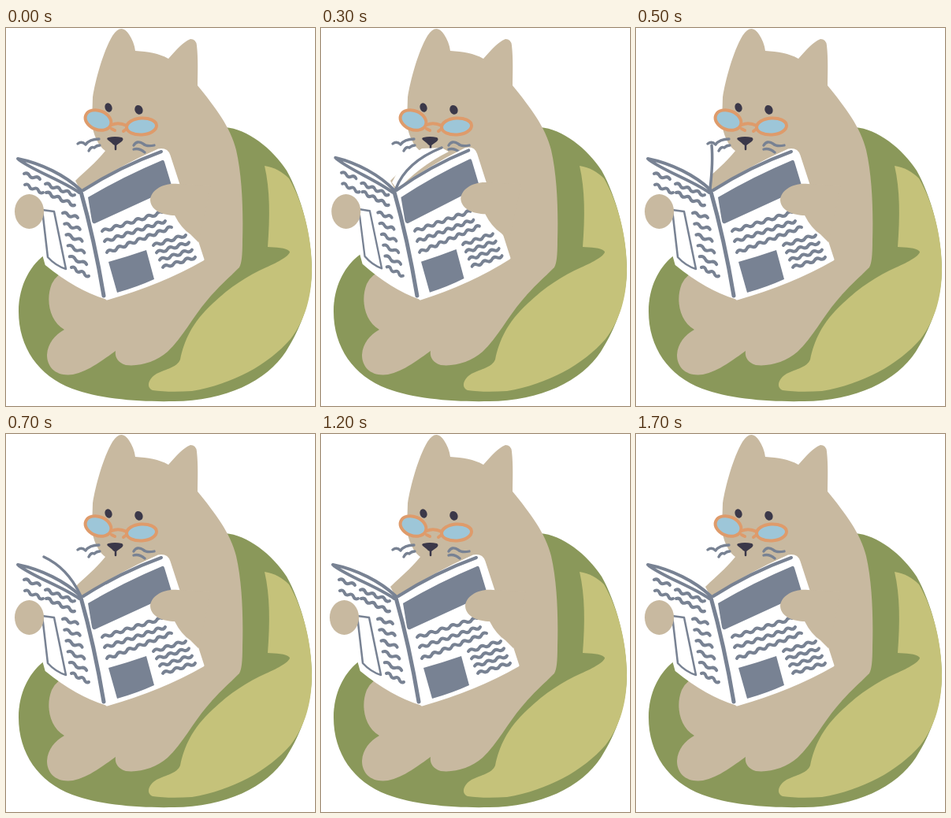
Write an HTML page that moves like this. It is 392 px wide and 480 px high and loops after 1800 ms.

```html
<!DOCTYPE html>
<html lang="en">
<head>
<meta charset="utf-8">
<title>Cat reading a newspaper</title>
<style>
  html, body { margin: 0; height: 100%; overflow: hidden; background: #fff; }
  svg { display: block; width: 100vw; height: 100vh; stroke-linecap: round; stroke-linejoin: round; }
  .fur { fill: #c8b9a0; }
  .paper { fill: #fff; stroke: #fff; stroke-width: 3; }
  .slate { fill: #788293; }
  .line { fill: none; stroke: #788293; stroke-width: 4; }
  .frame { fill: none; stroke: #de9b6b; stroke-width: 4; }
  .dark { fill: #3b3849; }
</style>
</head>
<body>
<svg viewBox="0 0 392 480">
  <path fill="#8a985a" d="M278 126C306 128 338 153 356 181C375 215 387 262 388 304C388 342 376 378 355 411C331 448 278 474 213 474C170 475 118 471 84 458C41 442 16 405 16 360C16 326 32 299 52 286L200 200Z"/>
  <path fill="#c5c27a" d="M328 175C341 177 351 183 359 191C377 222 388 265 388 306C388 340 380 370 361 395C332 428 288 452 236 461Q206 463 186 460C177 456 181 445 191 439C203 433 217 431 221 421C226 397 236 374 262 350C284 329 307 314 330 304C346 297 360 289 360 284C355 278 342 279 332 278C335 240 335 205 328 175Z"/>
  <path class="fur" d="M110 88C113 68 123 30 135 10Q146 -7 156 8C160 14 163 21 164 29C180 30 194 32 206 39C215 29 224 18 234 14Q241 14 242 22C244 40 243 58 243 73C265 100 285 126 292 155C300 190 301 235 300 270C300 288 299 299 296 304C284 316 268 330 255 346C237 367 224 393 205 411C190 424 170 430 152 428C140 424 138 416 139 410C125 420 105 436 85 440C65 443 52 432 52 415C53 400 62 390 74 383C55 372 50 345 58 325Q65 311 78 309L112 260L95 207L88 194C100 182 113 172 126 156C117 150 110 134 109 120Z"/>

  <g class="dark">
    <ellipse cx="130" cy="101" rx="4.5" ry="5.800" transform="rotate(-20 130 101)"/>
    <ellipse cx="168.500" cy="104" rx="5" ry="6" transform="rotate(-25 168 104)"/>
    <path d="M130 139Q138 137 147 139Q150 141 147 144L140 149Q137 150 134 146L129 142Q127 140 130 139Z"/>
    <path d="M139 147V154" stroke="#3b3849" stroke-width="2.500"/>
  </g>
  <path class="line" style="stroke-width:3.300" d="M91 147Q96 143 101 148Q106 141 118 141M105 156Q108 150 112 152Q115 149 119 149M162 149Q166 142 174 147Q178 151 188 149M162 154Q169 152 176 158"/>
  <g class="frame">
    <ellipse cx="117" cy="117" rx="17" ry="12" fill="#9dc6d8" transform="rotate(22 117 117)"/>
    <ellipse cx="172" cy="125" rx="19" ry="10.500" fill="#9dc6d8" transform="rotate(-4 172 125)"/>
    <path d="M134 123Q143 119 153 124M134 128L138 130M149 131L153 128"/>
  </g>

  <g id="turning">
    <path id="sheet" fill="#fff"/>
    <path class="line" id="edge" style="stroke-width:3.500"/>
  </g>

  <g id="newspaper">
    <g id="left">
      <path class="paper" d="M14 166C45 172 75 187 95 207L127 343C98 334 73 318 51 300Z"/>
      <path class="line" d="M15 166C45 172 75 187 95 206M16 167C36 182 70 193 93 209"/>
      <path class="line" style="stroke-width:2.500" d="M46 231L61 233L76 306Q63 302 53 291Z"/>
      <g class="line" id="leftText"></g>
    </g>
    <g id="right">
      <path class="paper" d="M96 208Q145 176 193 155Q204 153 207 162L250 294Q196 325 128 344Z"/>
      <path class="line" d="M98 206Q145 176 197 157"/>
      <path class="slate" d="M104 215Q150 188 198 168Q200 167 201 170L211 203L113 248Q110 249 109 245Z"/>
      <path class="slate" d="M130 297Q155 290 178 282L188 319Q166 329 141 336Z"/>
      <g class="line" id="rightText"></g>
    </g>
    <path class="line" style="stroke-width:5" d="M95 208Q112 268 124 340"/>
  </g>
  <ellipse class="fur" id="leftPaw" cx="29.500" cy="233" rx="18.500" ry="22"/>
  <path class="fur" id="rightPaw" d="M218 198C200 196 183 206 183 219C184 232 200 238 214 238Q222 254 234 262L244 272L260 200Z"/>
</svg>
<script>
const $ = id => document.getElementById(id);

// Wavy line of handwriting-like "text" between two points.
function squiggle([x1, y1, x2, y2]) {
  const dx = x2 - x1, dy = y2 - y1, length = Math.hypot(dx, dy);
  const waves = Math.max(2, Math.round(length / 7));
  let d = `M${x1} ${y1}`;
  for (let i = 0; i < waves; i++) {
    const side = i % 2 ? 3.2 : -3.2, mid = (i + .5) / waves, end = (i + 1) / waves;
    d += `Q${x1 + dx * mid - dy / length * side} ${y1 + dy * mid + dx / length * side} ${x1 + dx * end} ${y1 + dy * end}`;
  }
  return `<path d="${d}"/>`;
}

const leftRows = [[23, 185, 43, 192], [24, 199, 47, 209], [50, 198, 87, 212], [51, 209, 87, 225]];
for (let i = 0; i < 6; i++) leftRows.push([72 + i * 2.2, 235 + i * 13.8, 91 + i * 2.8, 241 + i * 14.8]);
const rightRows = [[122, 258, 198, 234], [125, 271, 202, 245], [128, 285, 210, 253]];
for (let i = 0; i < 4; i++) rightRows.push([187 + i * 4, 276 + i * 9.3, 228 + i * 4, 263 + i * 9.3]);
$('leftText').innerHTML = leftRows.map(squiggle).join('');
$('rightText').innerHTML = rightRows.map(squiggle).join('');

const STEP = 100, STEPS = 18;
const folding = [0, 1, .85, .6];
// Turning sheet by step: visible edge and the return path closing its white area.
const sheets = {
  2: ['M94 204Q112 172 160 152', 'L186 153L97 206'],
  3: ['M95 204Q108 170 153 152', 'L162 157Q124 176 97 206L90 196Q104 168 128 153L153 152'],
  4: ['M92 200Q90 166 124 150', 'L126 187L97 206'],
  5: ['M94 204Q98 170 96 149', 'Q76 160 72 190'],
  6: ['M94 204Q88 172 68 151', 'L40 172'],
  7: ['M94 204Q78 170 48 156', 'L16 166M17 167C48 170 75 184 94 204']
};

const move = (id, x, y) => $(id).setAttribute('transform', `translate(${x} ${y})`);

// Narrow a page towards the slanted spine, which stays in place.
function foldPage(id, squeeze, lift) {
  const slope = .235, origin = 46.4;
  $(id).setAttribute('transform',
    `matrix(${1 - squeeze} ${lift} ${squeeze * slope} ${1 - lift * slope} ${squeeze * origin} ${-lift * origin})`);
}

function draw(now) {
  const step = Math.floor(now / STEP) % STEPS;
  const fold = folding[step] || 0, sheet = sheets[step];
  foldPage('left', .125 * fold, .03 * fold);
  foldPage('right', .11 * fold, -.023 * fold);
  move('newspaper', -3.5 * fold, 0);
  move('leftPaw', 3.8 * fold, 0);
  move('rightPaw', -9.5 * fold, -3 * fold);
  $('turning').style.display = sheet ? '' : 'none';
  if (sheet) {
    $('edge').setAttribute('d', sheet[0]);
    $('sheet').setAttribute('d', sheet.join('') + 'Z');
  }
}

const start = performance.now();
function tick() {
  draw(performance.now() - start);
  requestAnimationFrame(tick);
}
tick();
</script>
</body>
</html>
```
